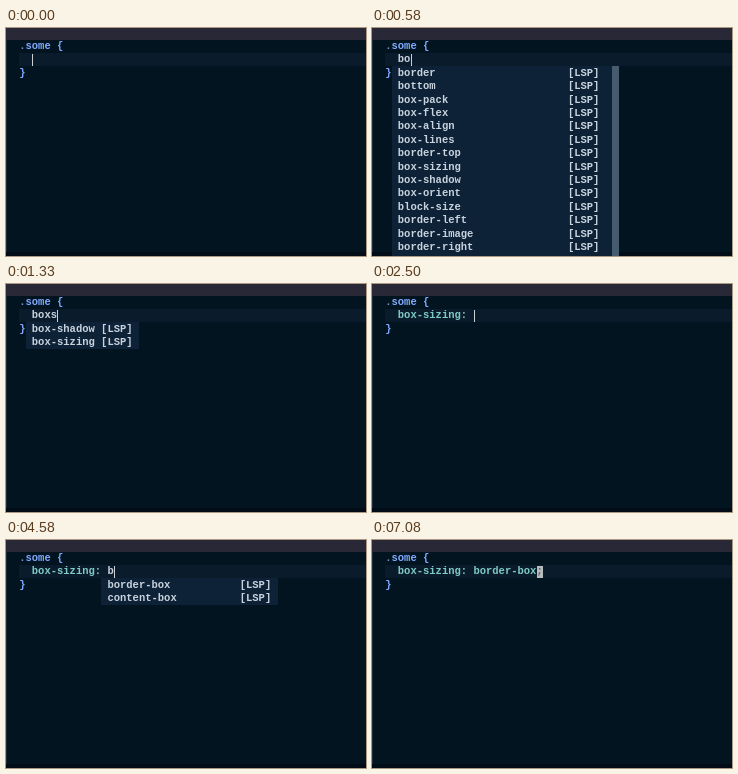
An HTML page with a canvas for the animation above (7.16 s loop, 360 by 228 pixels).

```html
<!DOCTYPE html>
<html lang="en">
<head>
<meta charset="utf-8">
<title>CSS completion</title>
<style>
html, body { margin: 0; width: 100%; height: 100%; overflow: hidden; background: #011420; }
canvas { display: block; width: 360px; height: 228px; }
</style>
</head>
<body>
<canvas id="stage" width="360" height="228"></canvas>
<script>
const ctx = document.getElementById('stage').getContext('2d');
const LOOP = 7160;
const CELL = 6.3, ROW = 13.4, LEFT = 13.2, TOP = 11.6;
const BLUE = '#82aaff', TEAL = '#80cbc4', TEXT = '#c9d3de';

const boxNames = ['pack', 'flex', 'align', 'lines', 'sizing', 'shadow', 'orient',
  'direction', 'flex-group', 'ordinal-group', 'decoration-break'].map(s => 'box-' + s);
const shortNames = ['border', 'bottom', ...boxNames.slice(0, 4)];
const longNames = ['border-top', ...boxNames.slice(4, 7), 'block-size',
  'border-left', 'border-image', 'border-right'];

// col: first text column; word: width of the name column; tail: cells after it
const menu = (items, col, word, tail = 7, scroll = false) => ({ items, col, word, tail, scroll });
const menus = {
  b: menu([...shortNames, 'background', ...longNames.slice(0, 7)], 2, 36, 8, true),
  bo: menu([...shortNames, ...longNames], 2, 26, 8, true),
  box: menu(boxNames, 2, 20),
  boxs: menu(['box-shadow', 'box-sizing'], 2, 10),
  boxsi: menu(['box-sizing'], 2, 10),
  value: menu(['border-box', 'content-box'], 14, 20),
  border: menu(['border-box'], 14, 10),
  next: menu(['all', 'border', 'box-shadow', 'box-sizing', 'text-decoration'], 25, 15)
};

// time, property, value, open menu
const steps = [
  [0, '', ''],
  [330, 'b', ''],
  [420, 'b', '', 'b'],
  [580, 'bo', '', 'bo'],
  [1080, 'box', '', 'bo'],
  [1170, 'box', '', 'box'],
  [1330, 'boxs', '', 'boxs'],
  [1500, 'boxsi', '', 'boxs'],
  [1670, 'boxsi', '', 'boxsi'],
  [1830, 'box-sizing', '', 'boxsi'],
  [2250, 'box-sizing', ':'],
  [2420, 'box-sizing', ': '],
  [4500, 'box-sizing', ': b'],
  [4580, 'box-sizing', ': b', 'value'],
  [4750, 'box-sizing', ': bo', 'value'],
  [4830, 'box-sizing', ': bo', 'border'],
  [5000, 'box-sizing', ': border-box', 'border'],
  [5330, 'box-sizing', ': border-box'],
  [5670, 'box-sizing', ': border-box;'],
  [5750, 'box-sizing', ': border-box;', 'next'],
  [6250, 'box-sizing', ': border-box;']
];
const NORMAL_MODE = 6330;

const colX = col => LEFT + col * CELL;
const rowY = row => TOP + row * ROW;

function rect(x, y, w, h, color) {
  ctx.fillStyle = color;
  ctx.fillRect(x, y, w, h);
}

function write(text, col, row, color) {
  ctx.fillStyle = color;
  ctx.fillText(text, colX(col), rowY(row) + 9.4);
}

function drawMenu({ items, col, word, tail, scroll }) {
  const x = Math.round(colX(col - 1));
  const right = Math.round(colX(col + word + tail));
  const bottom = scroll ? 228 : Math.round(rowY(2 + items.length));
  rect(x, 38, right - x, bottom - 38, '#0d2237');
  if (scroll) rect(right, 38, 7, bottom - 38, '#465b6d');
  items.forEach((name, i) => {
    write(name, col, i + 2, TEXT);
    write('[LSP]', col + word + 1, i + 2, TEXT);
  });
}

function drawWindow() {
  rect(0, 0, 360, 228, '#011420');
  rect(0, 0, 360, 12, '#282837');
  rect(0, 12, 1, 216, '#1d2b38');
  rect(0, 224, 360, 4, '#010c17');
  rect(13, 25, 347, 13, '#0a1c2c');
  write('.', 0, 0, '#6d98cf');
  write('some {', 1, 0, BLUE);
  write('}', 0, 2, BLUE);
}

function draw(t) {
  const [, prop, rest, open] = steps.findLast(s => s[0] <= t);
  const done = rest.endsWith(';');
  const end = 2 + prop.length + rest.length;
  drawWindow();
  write(prop, 2, 1, prop === 'box-sizing' ? TEAL : TEXT);
  write(rest.slice(0, 2), 2 + prop.length, 1, TEAL);
  write(rest.slice(2), 4 + prop.length, 1, done ? TEAL : TEXT);
  if (open) drawMenu(menus[open]);
  if (t >= NORMAL_MODE) {
    rect(165, 26, 6, 12, '#b9bcbd');
    write(';', end - 1, 1, '#53656c');
  } else {
    rect(Math.round(colX(end) + 0.4), 26, 1, 12, '#cdd1d4');
  }
}

function frame(now) {
  ctx.font = 'bold 10.5px "Liberation Mono", monospace';
  ctx.textBaseline = 'alphabetic';
  draw(now % LOOP);
  requestAnimationFrame(frame);
}
const start = performance.now();
const tick = () => frame(Math.max(0, performance.now() - start));
ctx.font = 'bold 10.5px "Liberation Mono", monospace';
draw(0);
(function loop() {
  draw((performance.now() - start) % LOOP);
  requestAnimationFrame(loop);
})();
</script>
</body>
</html>
```
